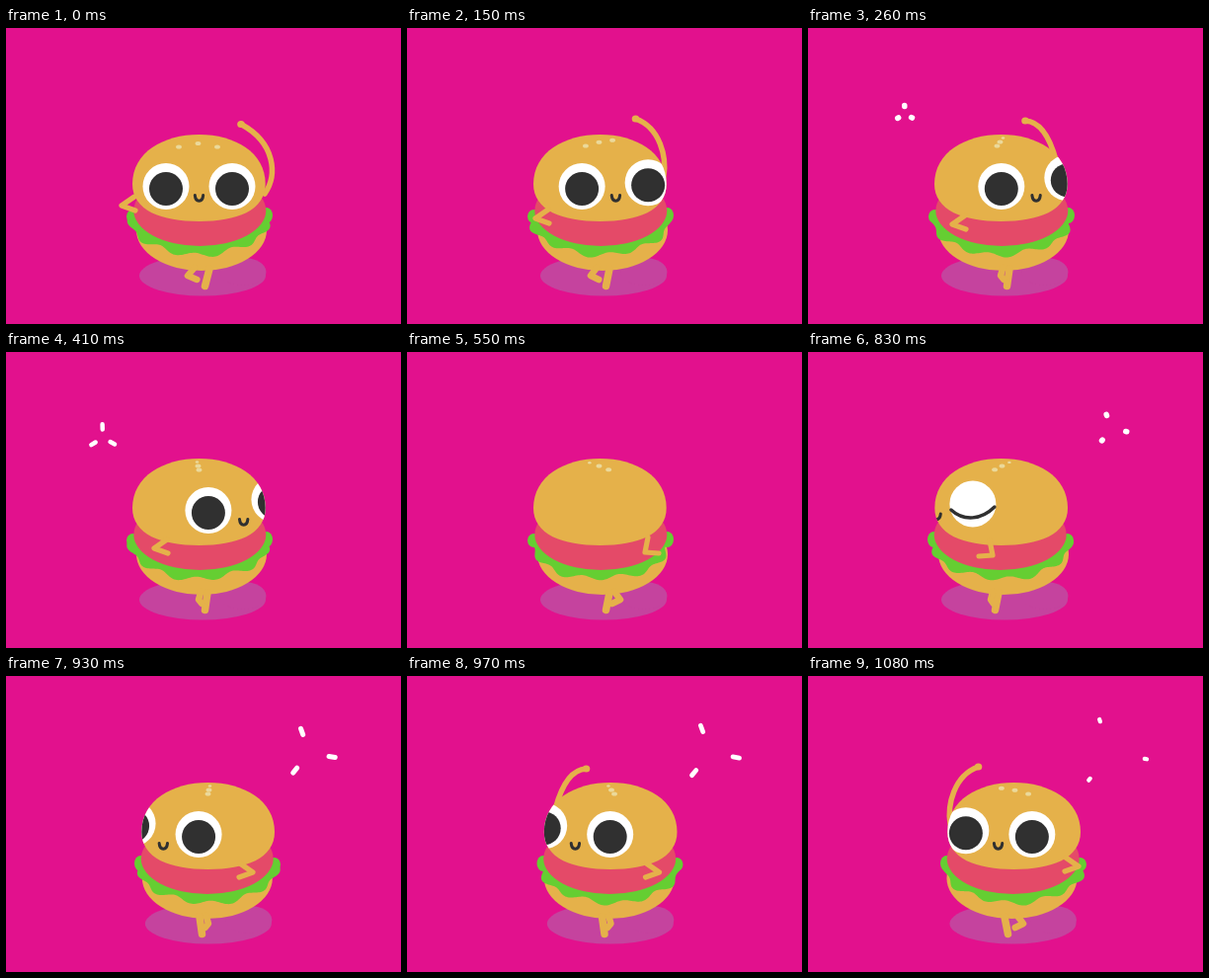
Write an HTML page with a canvas that moves like this. It is 400x300 px and loops after 1.23 s.

```html
<!DOCTYPE html>
<html lang="en">
<head>
<meta charset="utf-8">
<title>Dancing burger</title>
<style>
html, body { margin: 0; width: 100%; height: 100%; overflow: hidden; background: #e2118d; }
canvas { display: block; width: 400px; height: 300px; }
</style>
</head>
<body>
<canvas id="stage"></canvas>
<script>
const canvas = document.getElementById('stage');
const ctx = canvas.getContext('2d');
const ratio = window.devicePixelRatio || 1;
canvas.width = 400 * ratio;
canvas.height = 300 * ratio;

const BG = '#e2118d', BUN = '#e5b14a', MEAT = '#e44a68', LEAF = '#65ce32';
const SHADE = '#c5439e', DARK = '#303030', SEED = '#ebd99a';
const { PI, sin, cos, abs, exp, max } = Math;
const MID = 195.5, LOOP = 1230;

// Half a spin, front to back; the way round is the same poses mirrored.
// turn: radians, knee and lean: leg offsets, elbow: x, y, hand direction,
// wave: shoulder, hand and bow of the raised arm, sway: shift when mirrored
const poses = [
  { turn: 0, knee: -17, lean: 5, elbow: [117, 180, 1], wave: [262, 168, 238, 97.5, 13], sway: 0 },
  { turn: 0.24, knee: -15, lean: 4, elbow: [130, 193, 1], wave: [260, 150, 231.5, 92, 3], sway: 13 },
  { turn: 0.56, knee: -6, lean: 3, elbow: [146, 199, 1], wave: [251, 134, 220, 94, -5], sway: 10.5 },
  { turn: 0.74, knee: -6, lean: 3, elbow: [150, 199, 1], sway: 9 },
  { turn: 1.35, knee: 5, lean: -3, elbow: [204, 206, 1], low: true, blink: true, sway: 0 },
  { turn: 2.6, knee: 15, lean: 4, elbow: [241, 203, 1], low: true, sway: 0 },
  { turn: PI, knee: 12, lean: -2, elbow: [267, 197, -1], sway: 0 }
];
const starts = [0, 150, 260, 410, 450, 550, 650, 730, 830, 930, 970, 1080];

const bursts = [
  { x: 98, y: 87, angle: -1.6, from: 260, to: 450, near: 8, far: 12 },
  { x: 307.5, y: 78, angle: -1.92, from: 830, to: 1080, near: 15, far: 35 }
];

function disc(x, y, rx, ry, color) {
  ctx.fillStyle = color;
  ctx.beginPath();
  ctx.ellipse(x, y, rx, ry, 0, 0, PI * 2);
  ctx.fill();
}

function pen(color, width) {
  ctx.strokeStyle = color;
  ctx.lineWidth = width;
  ctx.lineCap = ctx.lineJoin = 'round';
}

function line(color, width, ...points) {
  pen(color, width);
  ctx.beginPath();
  points.forEach(p => ctx.lineTo(...p));
  ctx.stroke();
}

function curve(color, width, x, y, ...rest) {
  pen(color, width);
  ctx.beginPath();
  ctx.moveTo(x, y);
  ctx.bezierCurveTo(...rest);
  ctx.stroke();
}

function ground(shift) {
  disc(199 + shift, 251, 64, 20.5, SHADE);
  disc(240 + shift, 247, 23.5, 14, SHADE);
  disc(198 + shift, 205, 66, 41, BUN);
}

function legs({ knee, lean }) {
  line(BUN, 7.5, [201 + lean, 244], [201.5, 261.5]);
  line(BUN, 6.5, [201 + knee * 0.6, 243], [201 + knee, 251], [201 + knee * 0.45, 255]);
}

function raisedArm([sx, sy, hx, hy, bow]) {
  curve(BUN, 5.5, sx, sy, sx + bow, sy - 19, hx + 22 + bow, hy + 6 + bow, hx, hy);
  disc(hx, hy, 3.8, 3.6, BUN);
}

function hipArm({ elbow: [x, y, d], low }) {
  const shoulder = low ? [x + 3 * d, y - 15] : [x + 13 * d, y - 9];
  const hand = [x + 14 * d, y + (low ? 1 : 5)];
  line(BUN, 5.2, shoulder, [x, y], hand);
}

function lettuce(turn) {
  const crest = 1.22 + turn * 0.8;
  disc(MID - 67, 191, 6.5, 7, LEAF);
  disc(MID + 68, 190, 6.5, 8, LEAF);
  ctx.fillStyle = LEAF;
  ctx.beginPath();
  for (let a = 0; a < PI; a += 0.02) {
    const wave = 2.6 * cos(11 * (a - crest)) + sin(5 * a + turn);
    ctx.lineTo(MID - (70 + wave) * cos(a), 191 + (38.5 + wave) * sin(a) ** 0.85);
  }
  ctx.fill();
}

function bunPath() {
  const l = 128, r = 262.7;
  ctx.beginPath();
  ctx.moveTo(l, 158);
  ctx.bezierCurveTo(l, 126, MID - 36, 108, MID, 108);
  ctx.bezierCurveTo(MID + 36, 108, r, 126, r, 158);
  ctx.bezierCurveTo(r, 185, MID + 38, 196, MID, 196);
  ctx.bezierCurveTo(MID - 38, 196, l, 185, l, 158);
}

// Three seeds in a row, swung round the top of the bun
function seeds(turn) {
  const swing = 2.1 * (1 - exp(-2 * turn));
  for (let k = -1; k <= 1; k++) {
    const x = 194.5 + 19.5 * k * cos(swing);
    const y = 115.5 - 4 * k * sin(swing) + (1.5 + 3.5 * k * k) * cos(swing) ** 4;
    const size = y < 113 ? 0.6 : 1;
    disc(x, y, 2.9 * size, 2 * size, SEED);
  }
}

function eye(x, blink) {
  const y = blink ? 154 : 160.5 - 0.26 * max(0, abs(x - MID) - 34);
  disc(x, y, 23.5, 23.5, '#fff');
  if (blink) curve(DARK, 3.4, x - 22, y + 3, x - 9, y + 16, x + 9, y + 18, x + 22, y + 6);
  else disc(x, y + 2.5, 17, 17, DARK);
}

function face({ turn, blink }) {
  const off = 67 * sin(turn), x = MID + off;
  ctx.save();
  bunPath();
  ctx.clip();
  eye(MID + off * 0.95 - 33.5, blink);
  if (!blink) eye(MID + off * 0.95 + 33.5);
  const y = blink ? 164 : 169.5;
  curve(DARK, 3, x - 4.2, y, x - 3.5, y + 7.5, x + 3.5, y + 7.5, x + 4.2, y);
  ctx.restore();
}

function burger(p) {
  legs(p);
  if (p.wave) raisedArm(p.wave);
  lettuce(p.turn);
  disc(196.3, 185, 67, 36, MEAT);
  bunPath();
  ctx.fillStyle = BUN;
  ctx.fill();
  seeds(p.turn);
  if (p.turn < PI / 2) face(p);
  hipArm(p);
}

function burst({ x, y, angle, from, to, near, far }, at) {
  const p = (at - from) / (to - from);
  if (p < 0 || p > 1) return;
  const width = 5.5 - 1.3 * p;
  const half = (6.5 + 5 * sin(p * PI) - width) / 2;
  const dist = near + (far - near) * p;
  for (let i = 0; i < 3; i++) {
    const a = angle + i * PI * 2 / 3;
    const point = r => [x + r * cos(a), y + r * sin(a)];
    line('#fff', width, point(dist - half), point(dist + half));
  }
}

function draw(t) {
  const i = starts.filter(s => s <= t).length - 1;
  const mirrored = i >= poses.length;
  const pose = poses[mirrored ? starts.length - i : i];
  const sway = mirrored ? pose.sway : 0;
  ctx.setTransform(ratio, 0, 0, ratio, 0, 0);
  ctx.fillStyle = BG;
  ctx.fillRect(0, 0, 400, 300);
  ground(sway * 0.65);
  ctx.save();
  if (mirrored) {
    ctx.translate(2 * MID + sway, 0);
    ctx.scale(-1, 1);
  }
  burger(pose);
  ctx.restore();
  bursts.forEach(b => burst(b, starts[i]));
}

const begin = performance.now();
function tick() {
  draw((performance.now() - begin) % LOOP);
  requestAnimationFrame(tick);
}
tick();
</script>
</body>
</html>
```
